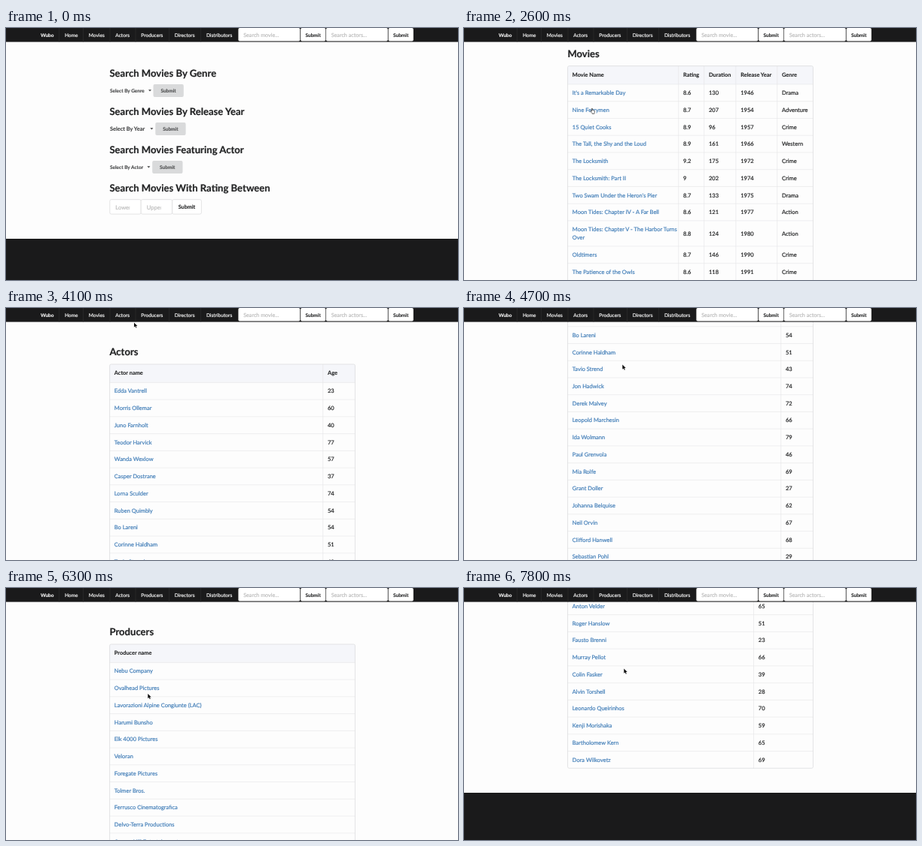
An HTML page that plays this animation: 600x336 px, repeating every 8000 ms.

```html
<!DOCTYPE html>
<html lang="en">
<head>
<meta charset="utf-8">
<title>Movie database tour</title>
<style>
  html, body { margin: 0; width: 100%; height: 100%; overflow: hidden; background: #fdfdfd; }
  svg { display: block; width: 100vw; height: 100vh; font-family: Lato, "Open Sans", sans-serif; text-rendering: geometricPrecision; }
  text { white-space: pre; }
</style>
</head>
<body>
<svg id="stage" viewBox="0 0 600 336"></svg>
<script>
const LOOP = 8000, STEP = 100;
const PAPER = '#fdfdfd', DARK = '#1a1a1b', INK = '#222324', LINK = '#427eb8', LINE = '#e4e5e6', EDGE = '#d9dadb', PALE = '#bcbcbc';
const ROW = 22.74, LEADING = 11.37, TABLE_TOP = 75, BODY_TOP = 99.4, NAV = 18.57;
const stage = document.getElementById('stage');

function el(tag, attrs, parent) {
  const node = document.createElementNS('http://www.w3.org/2000/svg', tag);
  for (const k in attrs) node.setAttribute(k, attrs[k]);
  parent.appendChild(node);
  return node;
}
const group = (parent) => el('g', {}, parent);
const rect = (parent, x, y, width, height, fill, extra) => el('rect', { x, y, width, height, fill, ...extra }, parent);
const line = (parent, x1, y1, x2, y2, stroke = LINE) => el('line', { x1, y1, x2, y2, stroke, 'stroke-width': .6 }, parent);

// Text whose capitals are centred on y
function label(parent, str, x, y, size, fill, bold, extra) {
  const look = { 'font-weight': bold ? 700 : 400, stroke: fill, 'stroke-width': bold ? .1 : .2 };
  const node = el('text', { x, y: y + size * .36, 'font-size': size, fill, ...look, ...extra }, parent);
  node.textContent = str;
  return node;
}
const heading = (parent, str, y) => label(parent, str, 137.4, y - .4, 13.1, INK, true, { 'stroke-width': .2 });

// ---- Data ----
const split = (s) => s.trim().split('\n').map((r) => r.trim().split('|'));

const movies = split(`
  It's a Remarkable Day|8.6|130|1946|Drama
  Nine Ferrymen|8.7|207|1954|Adventure
  15 Quiet Cooks|8.9|96|1957|Crime
  The Tall, the Shy and the Loud|8.9|161|1966|Western
  The Locksmith|9.2|175|1972|Crime
  The Locksmith: Part II|9|202|1974|Crime
  Two Swam Under the Heron's Pier|8.7|133|1975|Drama
  Moon Tides: Chapter IV - A Far Bell|8.6|121|1977|Action
  Moon Tides: Chapter V - The Harbor Turns~Over|8.8|124|1980|Action
  Oldtimers|8.7|146|1990|Crime
  The Patience of the Owls|8.6|118|1991|Crime
  Marlow's Ledger|8.9|195|1993|Drama
  Walter Plume|8.8|142|1994|Drama
  The Larkwell Pardon|9.3|142|1994|Drama
  Paper Fables|8.9|154|1994|Crime
  The Plain Detours|8.6|106|1995|Crime
  Eleventh|8.6|127|1995|Crime
  Bread Is Patient|8.6|116|1997|Comedy
  Brass Letter Q|8.5|119|1998|Drama
  Finding Captain Moll|8.6|169|1998|Drama
  The Lattice|8.7|136|1999|Action
  Chess Barn|8.8|139|1999|Drama
  The Heir of the Tides: The Journey of the~Fox|8.9|201|2003|Action
  The Heir of the Tides: The Pale Bridges|8.7|179|2002|Adventure
  Carried Along|8.6|125|2001|Animation
  Town of Ash|8.6|130|2002|Crime
  The Pale Warden|9|152|2008|Action
  Oblations|8.8|148|2010|Action`);

const FIRST = 'Edda,Morris,Juno,Teodor,Wanda,Casper,Lorna,Ruben,Hester,Osric,Petra'.split(',');
const LAST = 'Vantrell,Quimbly,Dostrane,Harvick,Ollemar,Brentano,Sculder,Wexlow,Farnholt'.split(',');
const person = (i) => [`${FIRST[i % 11]} ${LAST[i * 4 % 9]}`, String(23 + i * 37 % 57)];
const people = (from, n) => Array.from({ length: n }, (_, i) => person(from + i));

const actors = [...people(0, 8), ...split(`
  Bo Lareni|54
  Corinne Haldham|51
  Tavio Strend|43
  Jon Hadwick|74
  Derek Malvey|72
  Leopold Marchesin|66
  Ida Wolmann|79
  Paul Grenvola|46
  Mia Rolfe|69
  Grant Doller|27
  Johanna Belquise|62
  Neil Orvin|67
  Clifford Hanwell|68
  Sebastian Pohl|29`), ...people(9, 18)];

const directors = [...people(30, 10), ...split(`
  Anton Velder|65
  Roger Hanslow|51
  Fausto Brenni|23
  Murray Pellot|66
  Colin Fasker|39
  Alvin Torshell|28
  Leonardo Queirinhos|70
  Kenji Morishaka|59
  Bartholomew Kern|65
  Dora Wilkovetz|69`)];

const producers = [...split(`
  Nebu Company
  Ovalhead Pictures
  Lavorazioni Alpine Congiunte (LAC)
  Harumi Bunsho
  Elk 4000 Pictures
  Veloran
  Foregate Pictures
  Tolmer Bros.
  Ferrusco Cinematografica
  Delvo-Terra Productions
  Quarry Hill Entertainment`),
  ...Array.from({ length: 15 }, (_, i) => [`${LAST[i * 2 % 9]} ${['Pictures', 'Films', 'Productions', 'Company'][i % 4]}`])];

// ---- Pages ----
const pages = {};

function footer(page, y) {
  rect(page, 0, y, 600, 120, DARK);
}

function tablePage(key, title, cols, rows) {
  const g = group(stage);
  heading(g, title, 59);
  rect(g, 137.6, TABLE_TOP, 325.8, BODY_TOP - TABLE_TOP, '#f5f6fa', { rx: 2 });
  cols.forEach(([x, name]) => label(g, name, x, 86.6, 7.4, INK, true));
  let y = BODY_TOP;
  for (const cells of rows) {
    const parts = cells[0].split('~');
    const h = ROW + (parts.length - 1) * LEADING, mid = y + h / 2;
    line(g, 137.6, y, 463.4, y);
    parts.forEach((p, i) => label(g, p, cols[0][0], mid + (i - (parts.length - 1) / 2) * LEADING, 7.5, LINK));
    cells.slice(1).forEach((c, i) => label(g, c, cols[i + 1][0], mid, 7.5, INK));
    y += h;
  }
  cols.slice(1).forEach(([x]) => line(g, x - 6.3, TABLE_TOP, x - 6.3, y));
  rect(g, 137.6, TABLE_TOP, 325.8, y - TABLE_TOP, 'none', { rx: 2, stroke: EDGE, 'stroke-width': .7 });
  footer(g, y + 32.7);
  pages[key] = { g, max: y - 240.3 };
}

function homePage() {
  const g = group(stage);
  const selects = [
    ['Search Movies By Genre', 'Select By Genre', 6.5, 191, 195.5],
    ['Search Movies By Release Year', 'Select By Year', 7.4, 193.4, 198.3],
    ['Search Movies Featuring Actor', 'Select By Actor', 6.5, 189.4, 194.2],
  ];
  selects.forEach(([title, pick, size, caret, button], i) => {
    const y = 61 + i * 51, mid = y + 22.5;
    heading(g, title, y);
    label(g, pick, 137.9, mid, size, '#414243', true);
    el('path', { d: `M${caret - 2} ${mid - 1.2}h4l-2 2.2z`, fill: '#414243' }, g);
    rect(g, button, mid - 8.4, 40.3, 16.8, '#d9dadb', { rx: 2 });
    label(g, 'Submit', button + 20.1, mid, 6.5, '#4b4c4d', true, { 'text-anchor': 'middle' });
  });
  heading(g, 'Search Movies With Rating Between', 214);
  const box = { rx: 2, stroke: '#d8d9da', 'stroke-width': .7 };
  [['Lower', 137.8], ['Upper', 179.2]].forEach(([name, x], i) => {
    rect(g, x, 228.7, 41.4, 19.4, '#fff', box);
    const clip = el('clipPath', { id: 'clip' + i }, g);
    rect(clip, x + 7, 230, 19.4, 17, '#000');
    label(g, name, x + 7.5, 238.8, 7.6, PALE, false, { 'clip-path': `url(#clip${i})` });
  });
  rect(g, 220.6, 228.7, 38.8, 19.4, '#fff', box);
  label(g, 'Submit', 240, 238.6, 7.2, INK, true, { 'text-anchor': 'middle' });
  footer(g, 281);
  pages.home = { g, max: 0 };
}

rect(stage, 0, 0, 600, 336, PAPER);
homePage();
tablePage('movies', 'Movies', [[143.8, 'Movie Name'], [291, 'Rating'], [325, 'Duration'], [367.2, 'Release Year'], [422, 'Genre']], movies);
tablePage('actors', 'Actors', [[143.8, 'Actor name'], [427, 'Age']], actors);
tablePage('producers', 'Producers', [[143.8, 'Producer name']], producers);
tablePage('directors', 'Directors', [[143.8, 'Director name'], [390.8, 'Age']], directors);

// ---- Navigation bar ----
const nav = group(stage);
rect(nav, 0, 0, 600, NAV, DARK);
const hover = rect(nav, 0, 0, 0, NAV, '#fff', { opacity: .09 });
label(nav, 'Wubo', 45.9, 9.2, 6.5, '#fff', true);
const items = { home: [70.6, 'Home'], movies: [102.5, 'Movies'], actors: [138, 'Actors'], producers: [172, 'Producers'], directors: [216.5, 'Directors'], distributors: [258.6, 'Distributors'] };
for (const [x, name] of Object.values(items)) {
  line(nav, x, 0, x, NAV, '#2f3031');
  label(nav, name, x + 7.3, 9.2, 6.6, '#f4f4f4');
}
[['Search movie...', 308.4], ['Search actors...', 424.9]].forEach(([hint, x]) => {
  rect(nav, x, 0, 81.9, 17.6, '#fff', { rx: 1.8 });
  label(nav, hint, x + 6.8, 9.3, 7.2, PALE);
  rect(nav, x + 82.7, 0, 33.2, 17.6, '#fff', { rx: 1.8 });
  label(nav, 'Submit', x + 99.3, 9.3, 6.5, INK, true, { 'text-anchor': 'middle' });
});

// ---- Status bubble and pointer ----
const status = group(stage);
const bubble = rect(status, 0, 329, 60, 7, '#343536');
const address = label(status, '', 0, 332.8, 6, '#b4b5b6', false, { 'font-family': '"Liberation Sans", Arial, sans-serif', 'stroke-width': 0 });

const pointer = group(stage);
const arrow = el('path', { d: 'M0 0V6.3L1.5 4.9L2.5 7.2L3.5 6.8L2.5 4.6H4.5Z', fill: '#111', stroke: '#fff', 'stroke-width': .8, 'paint-order': 'stroke' }, pointer);
const hand = el('path', { d: 'M-.6 .4Q0-.3.6.4V2.7L2.7 3.1Q3.6 3.3 3.5 4.3L3 6.3V7.3H.1V6.6L-2 4.3Q-2.2 3.4-1.4 3.5L-.6 4.2Z', fill: '#fff', stroke: '#111', 'stroke-width': .6 }, pointer);

// ---- Timeline ----
const visits = [[0, 'home'], [2000, 'movies'], [3900, 'actors'], [6000, 'producers'], [7400, 'directors']];
const hovers = [[1800, 2200, 'movies'], [3400, 4100, 'actors'], [5700, 6100, 'producers'], [7300, 7500, 'directors']];
const bubbles = [[1900, 2200, 'movies'], [3700, 4100, 'actors'], [5800, 6100, 'producers'], [7300, 7500, 'directors']];
const hands = [...hovers, [2500, 2800, 'link']];
const path = [
  [500, 97, 319], [1400, 115, 11.5], [1800, 116, 9.5], [2100, 116, 9.5], [2600, 170, 107], [3000, 170, 107],
  [3400, 162.5, 9], [4000, 162.5, 9], [4400, 210.3, 75.5], [5400, 210.3, 75.5], [5800, 192, 9], [6000, 192, 9],
  [6300, 188.3, 141], [6700, 188.3, 141], [7100, 232, 11], [7400, 232, 9.5], [7700, 212.3, 107.5],
];
const scrolls = {
  home: [[0, 0]],
  movies: [[2300, 0], [2600, 24.4], [2800, 190], [3000, 420], [3200, pages.movies.max]],
  actors: [[4100, 0], [4500, 150], [4700, 256.6], [5000, 430], [5300, 500]],
  producers: [[6300, 0], [6400, 40], [6700, 390], [6900, pages.producers.max]],
  directors: [[7400, 0], [7500, 30], [7800, pages.directors.max]],
};

const smooth = (u) => u * u * (3 - 2 * u);
function track(keys, t, ease = (u) => u) {
  if (t <= keys[0][0]) return keys[0].slice(1);
  for (let i = 1; i < keys.length; i++) {
    const a = keys[i - 1], b = keys[i];
    if (t < b[0]) {
      const u = ease((t - a[0]) / (b[0] - a[0]));
      return a.slice(1).map((v, k) => v + (b[k + 1] - v) * u);
    }
  }
  return keys[keys.length - 1].slice(1);
}
const active = (spans, t) => (spans.find(([from, to]) => t >= from && t < to) || [])[2];
const show = (node, on) => node.setAttribute('display', on ? 'inline' : 'none');

function draw(t) {
  const current = visits.filter(([from]) => t >= from).pop()[1];
  for (const key in pages) show(pages[key].g, key === current);
  const [scroll] = track(scrolls[current], t);
  pages[current].g.setAttribute('transform', `translate(0 ${-scroll})`);

  const over = active(hovers, t);
  show(hover, over);
  if (over) {
    const order = Object.keys(items), x = items[over][0];
    hover.setAttribute('x', x);
    hover.setAttribute('width', items[order[order.indexOf(over) + 1]][0] - x);
  }

  const target = active(bubbles, t);
  show(status, target);
  if (target) {
    address.textContent = 'devserver:7421/' + target;
    bubble.setAttribute('width', 43 + target.length * 2.9);
  }

  const [x, y] = track(path, t, smooth);
  const pressing = Boolean(active(hands, t));
  show(pointer, t >= 600);
  show(arrow, !pressing);
  show(hand, pressing);
  pointer.setAttribute('transform', `translate(${x} ${y})`);
}

const start = performance.now();
function tick() {
  const t = (performance.now() - start) % LOOP;
  draw(Math.floor(t / STEP) * STEP);
  requestAnimationFrame(tick);
}
tick();
</script>
</body>
</html>
```
